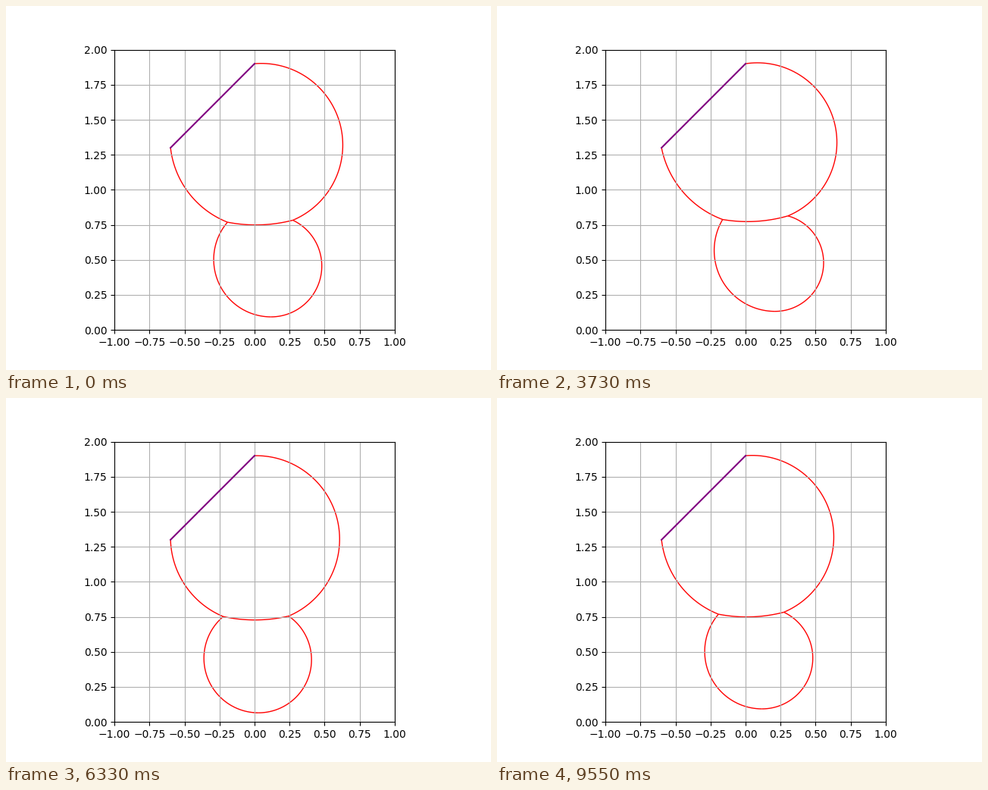
A matplotlib script that plays this animation: 640x480 px, repeating every 9650 ms.

```python
import numpy as np
import matplotlib.pyplot as plt
from matplotlib.animation import FuncAnimation

# Two pressurised cells hang from a rigid wall; a side pressure on the left
# pushes them to the right. Every membrane is a circular arc of fixed length,
# with radius = tension / pressure difference. Points are complex numbers.
TOP, SIDE = 0 + 1.9j, -0.6 + 1.3j
R_UP, R_LOW, HALF = 0.6, 0.384, 0.2335   # radii and half interface at rest
P_LOW = 0.361                            # lower pressure, upper one is 1

ALPHA = np.arcsin(HALF / R_UP)
BETA = np.arcsin(HALF / R_LOW)
GAMMA = np.arctan2((1 - P_LOW) * HALF,
                   R_UP * np.cos(ALPHA) + P_LOW * R_LOW * np.cos(BETA))
LEN_RIGHT = R_UP * (np.pi - ALPHA)
LEN_LEFT = R_UP * (np.pi / 2 - ALPHA)
LEN_MID = 2 * GAMMA * HALF / np.sin(GAMMA)
LEN_LOW = 2 * R_LOW * (np.pi - BETA)

STEPS, PEAK = 99, 25.8
INTERVAL, FRAMES = 50, 193


def unit(angle):
    return np.exp(1j * angle)


def arc(start, angle, radius, sweep, s=1.0):
    """Point at fraction s of an arc that leaves start at a heading."""
    turn = 1j * np.sign(sweep)
    return start + radius / turn * (unit(angle + s * sweep) - unit(angle))


def build(v):
    """Arcs of the whole shape from the seven unknowns."""
    head_a, r_a, head_b, r_b, head_e, r_e, push = v
    a = (TOP, head_a, r_a, -LEN_RIGHT / r_a)
    b = (SIDE, head_b, r_b, LEN_LEFT / r_b)
    right, left = arc(*a), arc(*b)

    pull = r_a * unit(head_a + a[3]) - P_LOW * r_e * unit(head_e)
    r_c = abs(pull) / (1 - P_LOW)
    c = (right, np.angle(pull), r_c, -LEN_MID / r_c)

    pull_d = (1 - push) * r_b * unit(head_b + b[3]) + abs(pull) * unit(c[1] + c[3])
    head_d = np.angle(pull_d)
    d = (left, head_d, abs(pull_d) / (P_LOW - push), -head_d)
    e = (right, head_e, r_e, -(head_e + np.pi))
    return a, b, c, d, e


def residual(v, shift):
    _, b, c, d, e = build(v)
    gap_mid = arc(*c) - arc(*b)
    foot = arc(*e)
    gap_low = arc(*d) - foot
    tension = d[2] * (P_LOW - v[6]) - e[2] * P_LOW
    length = d[2] * abs(d[3]) + e[2] * abs(e[3]) - LEN_LOW
    centre = foot.real + (e[2] - d[2]) / 2 - shift
    return np.array([gap_mid.real, gap_mid.imag, gap_low.real, gap_low.imag,
                     tension, length, centre])


def solve(v, shift, eps=1e-7):
    for _ in range(12):
        f = residual(v, shift)
        if np.abs(f).max() < 1e-10:
            break
        jac = np.column_stack([(residual(v + eps * row, shift) - f) / eps
                               for row in np.eye(7)])
        v = v - np.linalg.solve(jac, f)
    return v


def all_shapes():
    k = np.arange(STEPS + 1)
    shifts = 0.1007 + 0.0985 * np.cos(2 * np.pi * (k - PEAK) / STEPS)
    v = np.array([0, R_UP, -np.pi / 2, R_UP, -BETA, R_LOW, 0])
    shapes = {}
    for i in np.argsort(shifts):     # each solution starts the next one
        v = solve(v, shifts[i])
        shapes[i] = build(v)
    return shapes


def step_at(frame):
    """Steps last 100 ms, with a short skip at each extreme."""
    t = frame * INTERVAL
    if t < 2500:
        return t // 100
    if t < 7350:
        return t // 100 + 2
    return (t + 50) // 100 + 3


shapes = all_shapes()
s = np.linspace(0, 1, 80)

fig, ax = plt.subplots(figsize=(6.4, 4.8), dpi=100)
ax.set_aspect("equal")
ax.set_xlim(-1, 1)
ax.set_ylim(0, 2)
ax.grid(True)
ax.plot([SIDE.real, TOP.real], [SIDE.imag, TOP.imag], color="purple")
films = [ax.plot([], [], color="red", lw=1, zorder=1, solid_capstyle="butt")[0]
         for _ in range(5)]


def draw(frame):
    for film, part in zip(films, shapes[step_at(frame)]):
        z = arc(*part, s)
        film.set_data(z.real, z.imag)
    return films


anim = FuncAnimation(fig, draw, frames=FRAMES, interval=INTERVAL,
                     repeat=True, repeat_delay=0)
plt.show()
```
